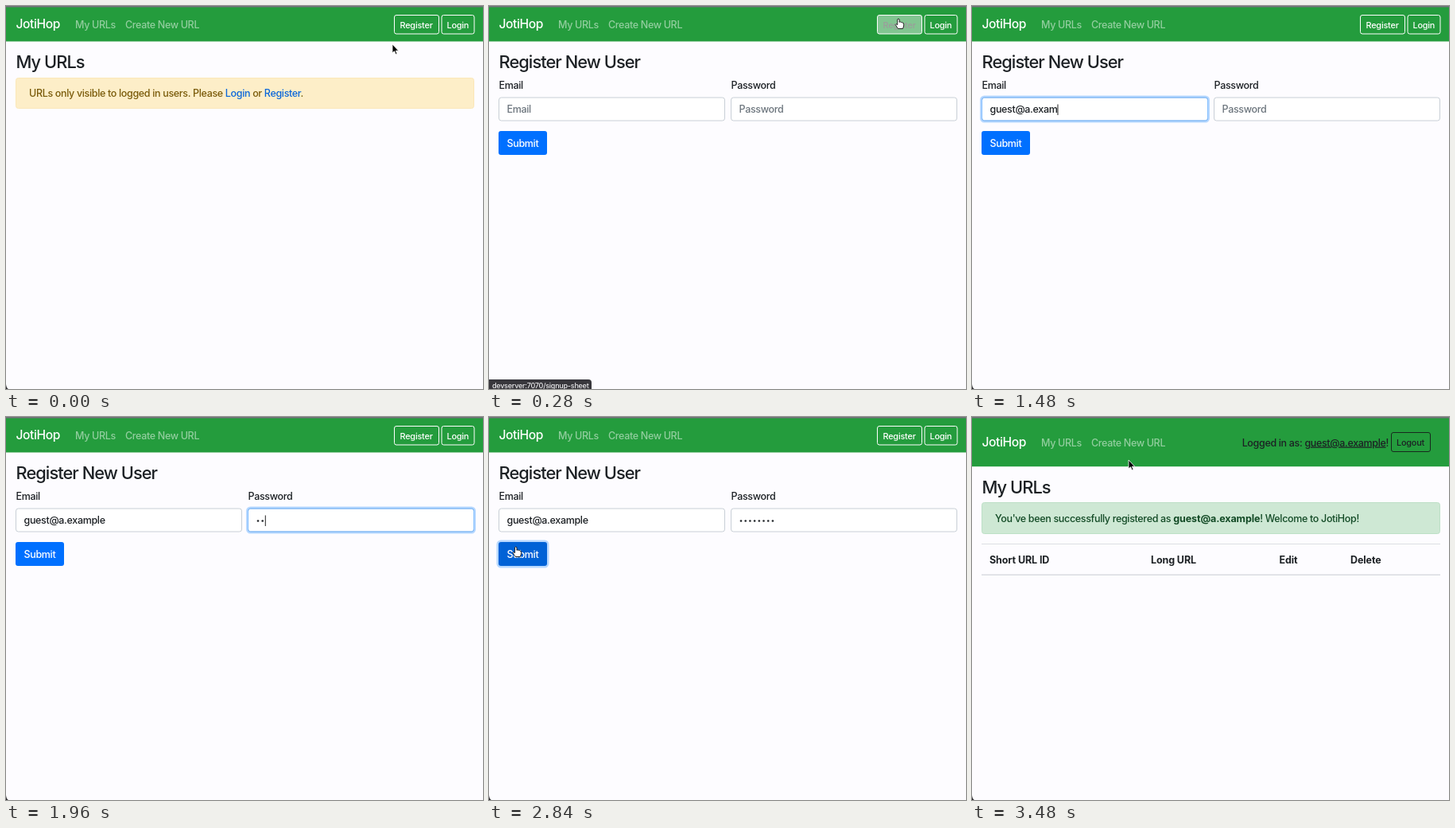
An HTML page for the animation above (3.52 s loop, 600 px wide and 481 px high).

```html
<!DOCTYPE html>
<html lang="en">
<head>
<meta charset="utf-8">
<title>Registration walkthrough</title>
<style>
  html, body { margin: 0; width: 100%; height: 100%; overflow: hidden; background: #fdfcff; }
  svg { display: block; width: 600px; height: 481px; }
  text { font: 450 12.5px Inter, "Open Sans", sans-serif; letter-spacing: -.027em; fill: #1c2024; white-space: pre; }
  .brand { font-size: 15.6px; fill: #fff; }
  .nav { fill: #fff; fill-opacity: .5; }
  .title { font-size: 21.8px; font-weight: 550; letter-spacing: -.043em; }
  .small { font-size: 10.9px; letter-spacing: -.02em; }
  .white { fill: #fff; }
  .hint { fill: #6c757d; }
  .link { fill: #0a67da; }
  .bold { font-weight: 700; letter-spacing: -.008em; }
  .outline { fill: none; stroke: #fff; }
  .warning { fill: #7a5b0a; }
  .success { fill: #124a25; }
  .field { fill: #fff; stroke: #c8cfd6; }
  .ring { fill: none; stroke: #007bff; stroke-opacity: .28; stroke-width: 3; }
  .active { fill: none; stroke: #80bdff; }
  .caret { stroke: #222; }
  .pointer { stroke: #fff; stroke-width: .8; stroke-linejoin: round; }
</style>
</head>
<body>
<svg viewBox="0 0 600 481">
  <rect width="600" height="481" fill="#fdfcff"/>
  <rect id="bar" width="600" height="44.5" fill="#249c3d"/>
  <rect width="600" height="1.5" fill="#75727c"/>
  <g id="menu">
    <text class="brand" x="12.5" y="28">JotiHop</text>
    <text class="nav" x="87" y="27.5">My URLs</text>
    <text class="nav" x="150" y="27.5">Create New URL</text>
  </g>

  <g id="guest">
    <rect id="registerFill" x="488.5" y="11.5" width="56" height="23.5" rx="2.5" fill="#f8f9fa"/>
    <rect class="outline" x="488.5" y="11.5" width="56" height="23.5" rx="2.5"/>
    <rect class="outline" x="548" y="11.5" width="41" height="23.5" rx="2.5"/>
    <text id="registerText" class="small" x="495.5" y="27.5">Register</text>
    <text class="small white" x="554.5" y="27.5">Login</text>
  </g>

  <g id="landing">
    <text class="title" x="12.5" y="78">My URLs</text>
    <rect x="12.5" y="90.5" width="576" height="38" rx="3" fill="#fdeec8" stroke="#fbe7b8"/>
    <text class="warning" x="29" y="114">URLs only visible to logged in users. Please <tspan class="link">Login</tspan> or <tspan class="link">Register</tspan>.</text>
  </g>

  <g id="form">
    <text class="title" x="12.5" y="78">Register New User</text>
    <text x="12.5" y="104">Email</text>
    <text x="304.5" y="104">Password</text>
    <rect class="field" x="12.5" y="115" width="284" height="29" rx="3"/>
    <rect class="field" x="304.5" y="115" width="284" height="29" rx="3"/>
    <g id="focus">
      <rect class="ring" x="11.5" y="114" width="286" height="31" rx="4"/>
      <rect class="active" x="12.5" y="115" width="284" height="29" rx="3"/>
    </g>
    <text id="email" x="22.5" y="134"></text>
    <text id="passwordHint" class="hint" x="314.5" y="134">Password</text>
    <g id="dots"></g>
    <path id="caret" class="caret" d="M0 123.5v13.5"/>
    <rect id="submitRing" class="ring" x="11" y="156" width="63" height="32" rx="4"/>
    <rect id="submit" x="12" y="157" width="61" height="30" rx="3"/>
    <text class="white" x="22.5" y="176.5">Submit</text>
  </g>

  <g id="done">
    <text x="524" y="36.5" text-anchor="end">Logged in as: <tspan text-decoration="underline">guest@a.example</tspan>!</text>
    <rect x="527.5" y="19.5" width="49" height="24" rx="2.5" fill="none" stroke="#17281d"/>
    <text class="small" x="534" y="36">Logout</text>
    <text class="title" x="12.5" y="96">My URLs</text>
    <rect x="12.5" y="107.5" width="576" height="39" rx="3" fill="#cee8d4" stroke="#bde0c6"/>
    <text class="success" x="29" y="132">You've been successfully registered as <tspan class="bold">guest@a.example</tspan>! Welcome to JotiHop!</text>
    <path d="M12 159.5H589" stroke="#dcdfe3"/>
    <path d="M12 198.2H589" stroke="#d9dce1" stroke-width="1.6"/>
    <text class="bold" x="22" y="183.5">Short URL ID</text>
    <text class="bold" x="225" y="183.5">Long URL</text>
    <text class="bold" x="386.5" y="183.5">Edit</text>
    <text class="bold" x="476" y="183.5">Delete</text>
  </g>

  <path d="M0 475Q.5 480 3 481H0Z" fill="#29282c"/>
  <g id="status">
    <path d="M0 469H125Q129 469 129 473V481H0Z" fill="#38373c"/>
    <text x="4" y="479.5" style="font-size:9px;fill:#ececee">devserver:7070/signup-sheet</text>
  </g>

  <g id="cursor">
    <path id="arrow" class="pointer" d="M0 0V11L2.5 8.7 4.3 12.7 6 12 4.3 8.2H7.7Z"/>
    <path id="hand" d="M-1.2 5.5V.8Q0-.8 1.2.8V4.3Q2.8 3.3 3.5 4.6 4.9 3.8 5.3 5.3 6.9 5 6.7 6.8V9L5.5 12.5H-.5L-3.8 7.5Q-3.5 5.9-1.2 7.5Z" fill="#fff" stroke="#111" stroke-width=".9"/>
    <path id="beam" d="M-2-5.5Q0-5.5 0-4.5 0-5.5 2-5.5M0-4.5V4.5M-2 5.5Q0 5.5 0 4.5 0 5.5 2 5.5" fill="none" stroke="#222"/>
  </g>
</svg>

<script>
const LOOP = 3520, STEP = 40, ADDRESS = "guest@a.example";
const el = id => document.getElementById(id);
const show = (id, on) => el(id).style.display = on ? "" : "none";
const set = (id, name, value) => el(id).setAttribute(name, value);
const clamp = (v, lo = 0, hi = 1) => Math.min(hi, Math.max(lo, v));
const ramp = (t, from, to) => clamp((t - from) / (to - from));

// Cursor stops: time, x, y
const route = [
  [0, 486, 48], [40, 490, 44], [160, 515, 16], [320, 515, 16],
  [480, 62, 130], [2600, 62, 130], [2760, 34, 164], [2920, 33.5, 162],
  [3320, 48, 148], [3400, 76, 120], [3480, 197, 54]
];

function cursorAt(t) {
  const i = route.findIndex(stop => stop[0] > t);
  if (i < 0) return route[route.length - 1].slice(1);
  const [t0, x0, y0] = route[i - 1], [t1, x1, y1] = route[i];
  const k = ramp(t, t0, t1), e = k * k * (3 - 2 * k);
  return [x0 + (x1 - x0) * e, y0 + (y1 - y0) * e];
}

el("dots").innerHTML = Array.from({ length: 8 }, (_, i) =>
  `<circle cx="${317 + i * 5.7}" cy="130.5" r="1.3" fill="#212529"/>`).join("");

function drawNav(t, done) {
  set("bar", "height", done ? 62.2 : 44.5);
  set("menu", "transform", `translate(0 ${done ? 9 : 0})`);
  const hover = t < 240 ? ramp(t, 120, 240)
    : t < 360 ? ramp(t, 240, 330)
    : 1 - ramp(t, 340, 440);
  const shade = 255 - 222 * hover;
  set("registerFill", "opacity", hover);
  el("registerText").style.fill = `rgb(${shade},${shade},${shade})`;
  show("status", t >= 160 && t < 440);
}

function drawForm(t) {
  const typed = clamp(Math.floor((t - 465) / 80), 0, ADDRESS.length);
  const dots = clamp(Math.floor((t - 1680) / 100), 0, 8);
  const inPassword = t >= 1700, pressed = t >= 2800;
  const email = el("email");
  email.textContent = typed ? ADDRESS.slice(0, typed) : "Email";
  email.setAttribute("class", typed ? "" : "hint");
  show("passwordHint", !dots);
  [...el("dots").children].forEach((dot, i) => dot.style.display = i < dots ? "" : "none");

  const focused = t >= 500 && !pressed;
  show("focus", focused);
  set("focus", "transform", `translate(${inPassword ? 292 : 0} 0)`);
  set("focus", "opacity", inPassword ? ramp(t, 1660, 1760) : ramp(t, 460, 560));
  const caretX = inPassword ? 314.5 + (dots && dots * 5.7 + .4)
    : 23 + (typed && email.getComputedTextLength());
  show("caret", focused);
  set("caret", "transform", `translate(${caretX} 0)`);

  set("submit", "fill", t >= 2720 ? "#0062d6" : "#0070ff");
  show("submitRing", pressed);
}

function drawCursor(t) {
  const [x, y] = cursorAt(t);
  const hand = t >= 120 && t < 360 || t >= 2720 && t < 2880;
  const beam = t >= 440 && t < 2720;
  show("cursor", t < 560 || t > 2600);
  show("hand", hand);
  show("beam", beam);
  show("arrow", !hand && !beam);
  set("cursor", "transform", `translate(${x} ${y})`);
}

function draw(now) {
  const t = Math.floor(now % LOOP / STEP) * STEP;
  const landing = t < 240, done = t >= 2880;
  show("landing", landing);
  show("form", !landing && !done);
  show("guest", !done);
  show("done", done);
  drawNav(t, done);
  if (!landing && !done) drawForm(t);
  drawCursor(t);
}

let start;
function tick(now) {
  start ??= now;
  draw(now - start);
  requestAnimationFrame(tick);
}
draw(0);
requestAnimationFrame(tick);
</script>
</body>
</html>
```
